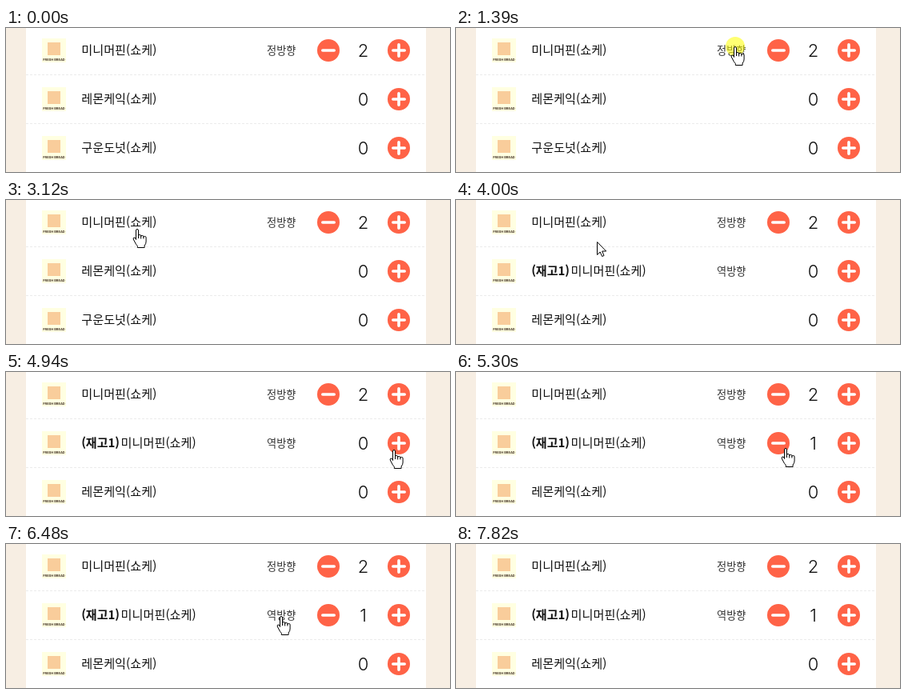
Write an HTML page that moves like this. It is 555 by 180 pixels and loops after 8.43 s.

```html
<!DOCTYPE html>
<html lang="ko">
<head>
<meta charset="utf-8">
<style>
html, body { margin: 0; width: 100%; height: 100%; overflow: hidden; background: #f7eee3; }
svg { display: block; }
text { font-family: 'Noto Sans CJK KR', 'Noto Sans CJK', sans-serif; fill: #111; }
.name { font-size: 15.2px; }
.stock { font-size: 15px; font-weight: 700; }
.side { font-size: 13.2px; fill: #333; }
.count { font: 300 22px Inter, sans-serif; text-anchor: middle; }
.label { font: 700 4px Inter, sans-serif; text-anchor: middle; fill: #4a3a2c; }
.sign { stroke: #fff; stroke-width: 3.6; stroke-linecap: round; }
.divider { stroke: #ebebeb; stroke-dasharray: 3 2; }
.cursor path { fill: #fff; stroke: #000; stroke-linejoin: round; }
</style>
</head>
<body>
<svg width="555" height="180" viewBox="0 0 555 180">
  <rect x="25" width="500" height="180" fill="#fff"/>
  <path class="divider" d="M25 58.5H525M25 119.5H525"/>
  <g id="rows"></g>
  <circle id="click" r="12" fill="#ff0" fill-opacity=".55"/>
  <g id="cursor" class="cursor">
    <path id="arrow" d="M.5 .5V16.5L4.2 13 6.6 18.5 9 17.5 6.7 12H11.7Z"/>
    <g id="hand">
      <path d="M-1.5 13.5V2q0-1.5 1.5-1.5T1.5 2V8.7q0-1.2 1.6-1.2t1.6 1.4v.6q0-1.1 1.6-1.1t1.6 1.4v.6q0-1 1.6-1t1.6 1.6V16q0 3-2 5v2.5H.3V21.3q-2-1.8-3-4.3l-1.6-3q-1.2-2.3 .1-2.9t2.2 .8Z"/>
      <path d="M1.5 8.5V12M4.7 9V12.5M7.9 10V12.5"/>
    </g>
  </g>
</svg>
<script>
const LOOP = 8430, STEP = 1000 / 15, ROW_GAP = 61;
const SHOWN = 130, GONE = 7820;
const $ = id => document.getElementById(id);
const between = (t, from, to) => t >= from && t < to;

// The cursor glides from each stop to the next; an optional bend curves the way.
const entry = [325, 140];
const moves = [
  { start: SHOWN, steps: 3, to: [248, 113] },
  { start: 860, steps: 4, to: [349, 23] },
  { start: 1660, steps: 1, to: [348, 25] },
  { start: 2330, steps: 12, to: [164, 36], bend: [314, 88] },
  { start: 3260, steps: 1, to: [165, 34] },
  { start: 3730, steps: 1, to: [169, 27] },
  { start: 4000, steps: 5, to: [341, 105], bend: [136, 59] },
  { start: 4610, steps: 7, to: [487, 98], bend: [440, 84] },
  { start: 5290, steps: 8, to: [344, 91], bend: [300, 92] },
  { start: 5950, steps: 1, to: [344, 90] },
  { start: 6490, steps: 4, to: [343, 97], bend: [358, 95] },
  { start: 7550, steps: 2, to: [512, 179] }
];

const clicks = { flipFirst: 1390, flipFirstBack: 2060, split: 3660, add: 5150, flipStock: 5890, flipStockBack: 6350 };
const CLICK_TIME = 68;

function cursorAt(t) {
  const i = moves.findLastIndex(move => t >= move.start);
  const { start, steps, to, bend } = moves[i];
  const from = i ? moves[i - 1].to : entry;
  const step = Math.floor((t - start + 8) / STEP) + 1;
  const u = 1 - (1 - Math.min(1, step / steps)) ** 2;
  return to.map((end, axis) => {
    const middle = bend ? bend[axis] : (from[axis] + end) / 2;
    return Math.round((1 - u) ** 2 * from[axis] + 2 * u * (1 - u) * middle + u * u * end);
  });
}

function rowsAt(t) {
  const done = name => t >= clicks[name] + CLICK_TIME;
  const sideOf = reversed => reversed ? '역방향' : '정방향';
  const first = { name: '미니머핀(쇼케)', side: sideOf(done('flipFirst') && !done('flipFirstBack')), count: 2 };
  const stock = { ...first, stock: true, side: sideOf(!done('flipStock') || done('flipStockBack')), count: +done('add') };
  const others = ['레몬케익(쇼케)', '구운도넛(쇼케)'].map(name => ({ name, count: 0 }));
  return [first, ...(done('split') ? [stock] : []), ...others].slice(0, 3);
}

const button = (x, sign) =>
  `<circle cx="${x}" r="14" fill="#ff6347"/><path class="sign" d="M${x - 7.2} 0h14.4${sign === '+' ? 'm-7.2-7.2v14.4' : ''}"/>`;

const drawRow = (row, i) => `<g transform="translate(0 ${28 + i * ROW_GAP})">
  <rect x="45" y="-15" width="30" height="30" fill="#ffffe1"/>
  <rect x="52" y="-10" width="16" height="16" fill="#f9cd9b"/>
  <text class="label" x="60" y="13.3">FRESH BREAD</text>
  ${row.stock ? '<text class="stock" x="94.2" y="5">(재고1)</text>' : ''}
  <text class="name" x="${row.stock ? 143.5 : 94.2}" y="5">${row.name}</text>
  ${row.side ? `<text class="side" x="326" y="5">${row.side}</text>` : ''}
  ${row.count ? button(403, '-') : ''}
  <text class="count" x="446.5" y="8">${row.count}</text>
  ${button(491, '+')}
</g>`;

function isClickable([x, y], rows) {
  const i = Math.floor(y / ROW_GAP), row = rows[i], dy = y - 28 - i * ROW_GAP;
  if (!row) return false;
  const onButton = center => Math.hypot(x - center, dy) < 14;
  return between(x, 94, row.stock ? 239 : 189) && Math.abs(dy) < 10
    || row.side && between(x, 326, 364) && Math.abs(dy) < 8
    || onButton(491) || row.count > 0 && onButton(403);
}

const show = (id, visible) => $(id).setAttribute('visibility', visible ? 'visible' : 'hidden');

let drawn;
function render(t) {
  const rows = rowsAt(t), markup = rows.map(drawRow).join('');
  if (markup !== drawn) $('rows').innerHTML = drawn = markup;

  const visible = between(t, SHOWN, GONE);
  const point = visible ? cursorAt(t) : entry;
  const hand = isClickable(point, rows);
  show('arrow', visible && !hand);
  show('hand', visible && hand);
  show('click', Object.values(clicks).some(start => between(t, start, start + CLICK_TIME)));
  for (const id of ['cursor', 'click']) $(id).setAttribute('transform', `translate(${point})`);
}

const begin = performance.now();
function frame() {
  render((performance.now() - begin) % LOOP);
  requestAnimationFrame(frame);
}
frame();
</script>
</body>
</html>
```
